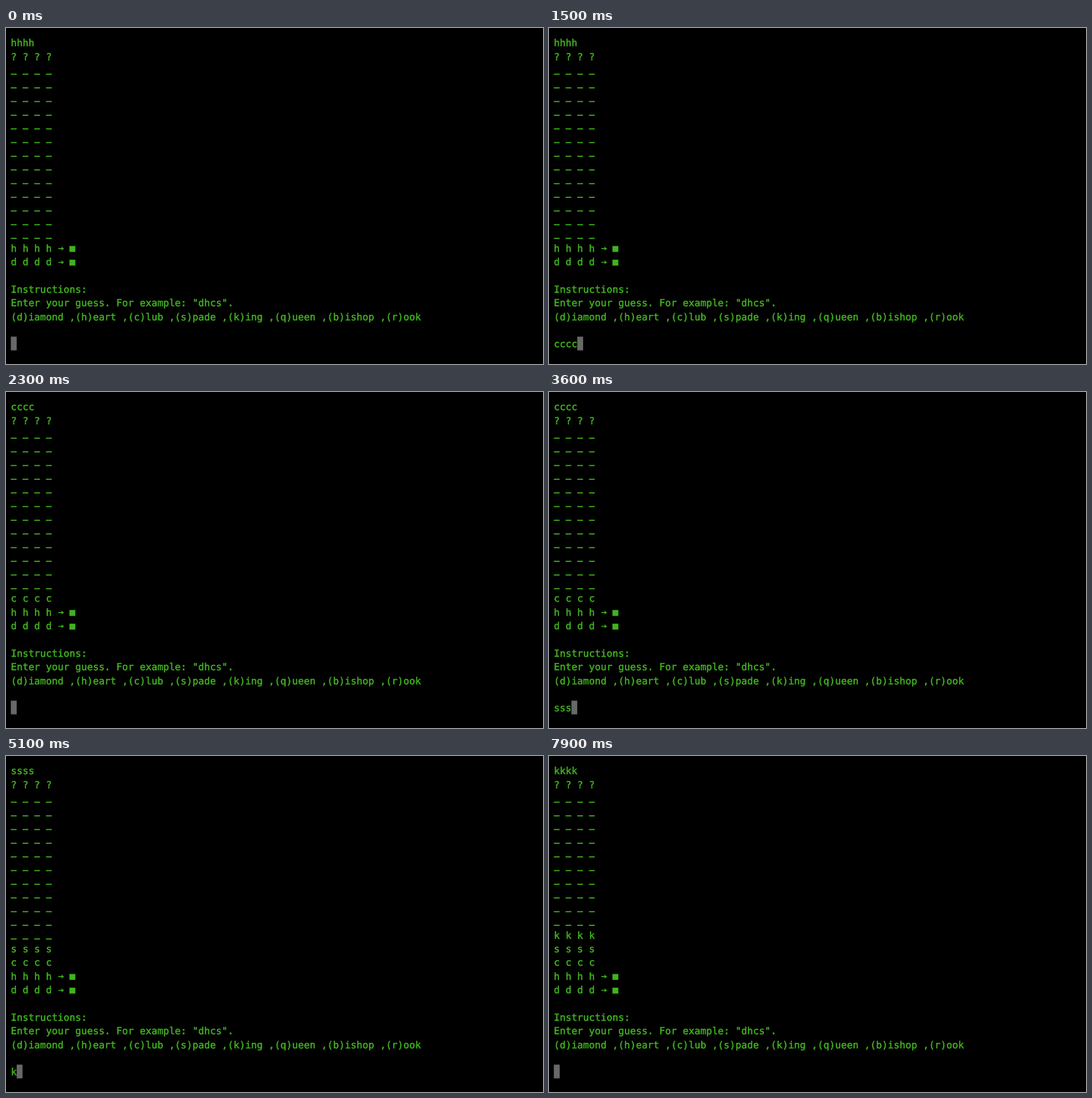
Recreate the animation shown at these times as an HTML page. Size 800 by 500 pixels, loop 8 s.

```html
<!DOCTYPE html>
<html lang="en">
<head>
<meta charset="utf-8">
<title>Code guessing game</title>
<style>
  html, body { margin: 0; width: 100%; height: 100%; overflow: hidden; background: #000; }
  svg { display: block; width: 800px; height: 500px; }
  text {
    font: 14.5px "DejaVu Sans Mono", monospace;
    white-space: pre;
    stroke: #41b31f;
    stroke-width: .45px;
    text-rendering: geometricPrecision;
  }
  #screen { fill: #41b31f; }
  #cursor { fill: #686868; }
</style>
</head>
<body>
<svg viewBox="0 0 800 500">
  <g id="screen"></g>
  <rect id="cursor" y="459.3" width="8.7" height="20.4"/>
</svg>
<script>
const LOOP = 8000, LEFT = 7.2, COL = 8.73, ROW = 20.36, BASE = 27.3;
const INPUT_ROW = 22, FIRST_SLOT = 2, LAST_SLOT = 16;
const HELP = [
  'Instructions:',
  'Enter your guess. For example: "dhcs".',
  '(d)iamond ,(h)eart ,(c)lub ,(s)pade ,(k)ing ,(q)ueen ,(b)ishop ,(r)ook'
];

// Key presses, then the return key and the redraw of the board.
const ROUNDS = [
  { key: 'c', typed: [800, 1100, 1400, 1500], enter: 1800, redraw: 1900 },
  { key: 's', typed: [3000, 3300, 3600, 3800], enter: 4000, redraw: 4000 },
  { key: 'k', typed: [5100, 5300, 5600, 5800], enter: 6100, redraw: 6100 }
];

const screen = document.getElementById('screen');
const cursor = document.getElementById('cursor');
const x = col => LEFT + col * COL;
const y = row => BASE + row * ROW;

const text = (row, str) => `<text x="${x(0)}" y="${y(row)}">${str}</text>`;
const rect = (col, top, w, h) => `<rect x="${x(col)}" y="${top}" width="${w}" height="${h}"/>`;
const spaced = key => Array(4).fill(key).join(' ');

const blanks = row => [0, 2, 4, 6].map(col => rect(col, y(row) - .1, 8.6, 1.6)).join('');

// Arrow and peg shown beside a scored guess.
function score(row) {
  const ax = x(8) + 1, ay = y(row) - 4.4;
  return `<path d="M${ax} ${ay - .7}h5.2l-1.2 -2.5l4.4 3.2l-4.4 3.2l1.2 -2.5h-5.2z"/>` +
    rect(10, y(row) - 8.3, 8.8, 8.8);
}

function stateAt(t) {
  const done = ROUNDS.filter(r => t >= r.redraw);
  const next = ROUNDS[done.length];
  return {
    guesses: ['d', 'h', ...done.map(r => r.key)],
    input: next ? next.key.repeat(next.typed.filter(at => t >= at).length) : '',
    scrolled: Boolean(next && t >= next.enter)
  };
}

function draw({ guesses, input, scrolled }) {
  let out = text(0, guesses[guesses.length - 1].repeat(4)) + text(1, spaced('?'));
  for (let row = FIRST_SLOT; row <= LAST_SLOT; row++) {
    const key = guesses[LAST_SLOT - row];
    out += key ? text(row, spaced(key)) : blanks(row);
    if (key === 'd' || key === 'h') out += score(row);
  }
  HELP.forEach((line, i) => out += text(LAST_SLOT + 2 + i, line));
  out += text(INPUT_ROW, input);
  screen.innerHTML = out;
  screen.setAttribute('transform', `translate(0 ${scrolled ? -ROW : 0})`);
  cursor.setAttribute('x', x(scrolled ? 0 : input.length));
}

let shown = '';
const start = performance.now();
function tick() {
  const state = stateAt((performance.now() - start) % LOOP);
  const id = JSON.stringify(state);
  if (id !== shown) {
    draw(state);
    shown = id;
  }
  requestAnimationFrame(tick);
}
tick();
</script>
</body>
</html>
```
